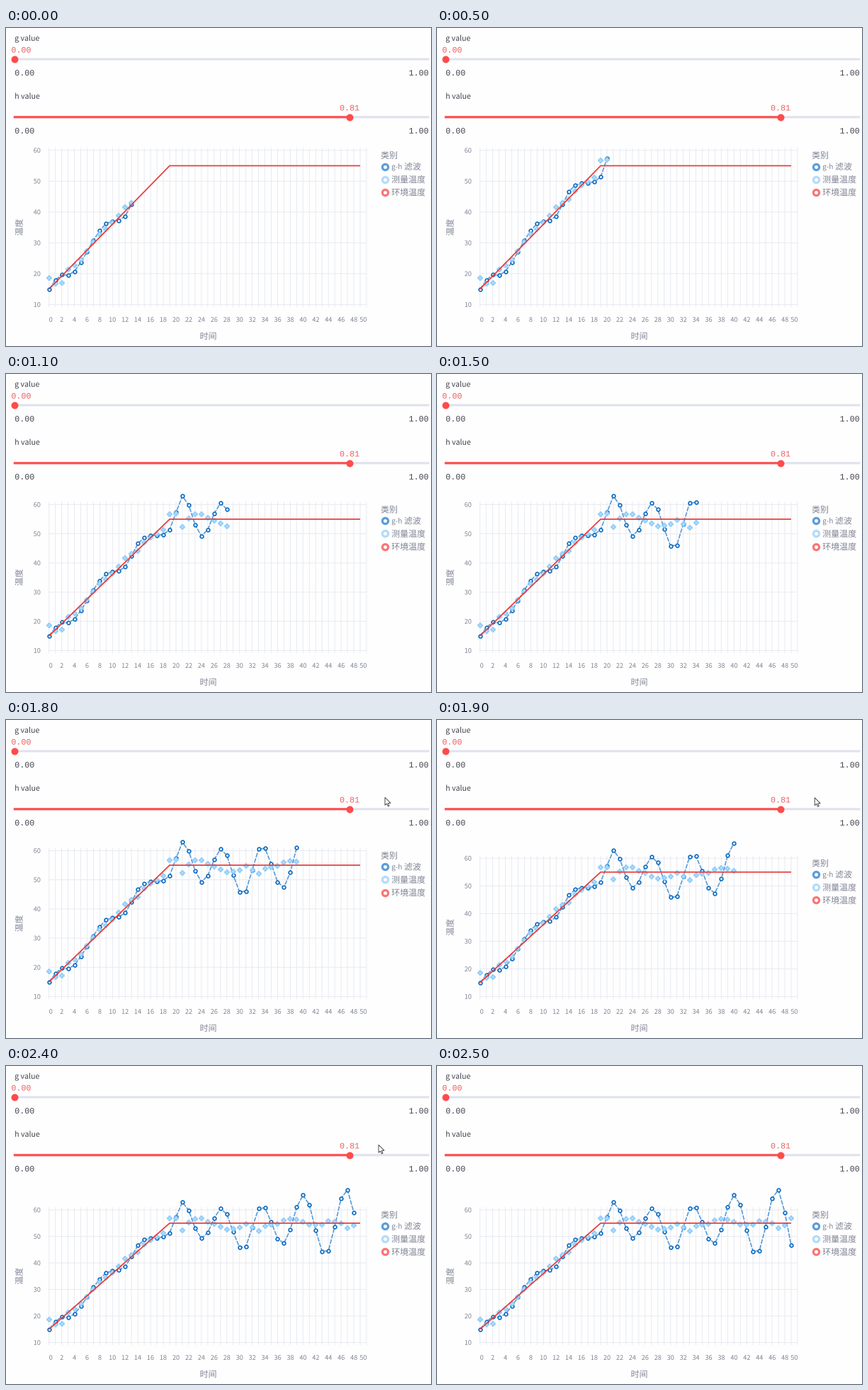
These frames come from a looping animation (600x449 px, 3200 ms). A matplotlib script:

```python
import numpy as np
import matplotlib.pyplot as plt
from matplotlib.animation import FuncAnimation
from matplotlib.collections import LineCollection
from matplotlib.patches import PathPatch, Polygon
from matplotlib.path import Path
from matplotlib.textpath import TextPath
from matplotlib.transforms import Affine2D

plt.rcParams["path.snap"] = False

W, H, DPI = 600, 449, 100
PX = 72 / DPI  # points per pixel
FRAMES, INTERVAL = 32, 100

SANS, MONO = "Noto Sans CJK JP", "Liberation Mono"
PAPER, RED, DARK, GRAY = "#fefefe", "#ff4b4b", "#41434e", "#808495"
BLUE, SKY = "#0f6cc0", "#8bcbfa"

X0, STEP, Y10 = 60.7, 8.965, 390.4
G, GAIN = 0.00, 0.81

# Turning points of the filter around the ambient temperature: hour, offset
SWINGS = [(0, 0), (1.5, 1), (3.7, -2.7), (8.7, 2.4), (11.9, -1.6),
          (14.4, 2.4), (18.9, -3.7), (21.05, 7.9), (24.1, -5.8), (27.2, 5.6),
          (30.5, -10), (33.5, 6.6), (36.8, -7.8), (40.1, 10.6),
          (43.5, -11.8), (46.8, 12.8), (49.8, -12.5)]


def eased(t, points):
    """Half cosine waves through the given turning points."""
    times, values = np.transpose(points)
    i = np.clip(np.searchsorted(times, t, "right") - 1, 0, len(times) - 2)
    part = np.clip((t - times[i]) / (times[i + 1] - times[i]), 0, 1)
    return values[i] + (values[i + 1] - values[i]) * (1 - np.cos(np.pi * part)) / 2


hours = np.arange(51)
ambient = np.minimum(15 + hours * 40 / 19, 55)
filtered = ambient + eased(hours, SWINGS)
# With g = 0 each reading z changes the filter's slope by h * (z - x).
slope = np.diff(filtered)
measured = filtered[:-1] + np.diff(slope, prepend=0) / GAIN

fig = plt.figure(figsize=(W / DPI, H / DPI), dpi=DPI, facecolor=PAPER)
ax = fig.add_axes([0, 0, 1, 1])
ax.set_xlim(0, W)
ax.set_ylim(H, 0)
ax.axis("off")


def x_at(hour):
    return X0 + STEP * hour


def place(patch, x, y, angle=0):
    flip = Affine2D().rotate_deg(angle).scale(1, -1).translate(x, y)
    patch.set_transform(flip + ax.transData)


def label(x, y, text, size, color=GRAY, align=0.5, font=SANS):
    """Outlined text centred vertically on y; align 0 is left, 1 is right."""
    path = TextPath((0, 0), text, size=size, prop={"family": font})
    box = path.get_extents()
    dx = -align * (box.x0 + box.x1) if align == 0.5 else -align * box.x1
    dy = -(0.33 if font == MONO else 0.37) * size
    patch = PathPatch(path.transformed(Affine2D().translate(dx, dy)),
                      fc=color, lw=0, zorder=7)
    ax.add_patch(patch)
    place(patch, x, y)
    return patch


def slider(y, name, value):
    left, right = 12.4, 596
    thumb = left + value * (right - left)
    for end, color in [(right, "#e0e3ee"), (thumb, RED)]:
        ax.plot([left, end], [y, y], color=color, lw=3.1 * PX)
    ax.plot(thumb, y, "o", color=RED, ms=10 * PX, mew=0)
    label(12.2, y - 29.8, name, 10.6, DARK, 0)
    label(max(thumb, 21.4), y - 13.2, f"{value:.2f}", 11.7, "#f05d60", font=MONO)
    label(12.2, y + 19.2, "0.00", 11.7, DARK, 0, MONO)
    label(596, y + 19.2, "1.00", 11.7, DARK, 1, MONO)


slider(44, "g value", G)
slider(125.8, "h value", GAIN)

# Fixed horizontal axis
for hour in range(0, 51, 2):
    label(x_at(hour), 411.5, str(hour), 9.1, align={0: 0, 50: 1}.get(hour, 0.5))
label(285.5, 434.9, "时间", 12)

# Parts that follow the vertical scale
grid = LineCollection([], colors="#e6e9f1", linewidths=0.9 * PX, zorder=1)
ax.add_collection(grid)
ticks = {v: label(48.4, 0, str(v), 9.1, align=1) for v in range(10, 61, 10)}
y_title = label(0, 0, "温度", 12)

legend = [(label(529, 0, "类别", 12, align=0), 529, 6.8)]
rings = []
for row, (color, text) in enumerate([("#5c9edb", ""), ("#b2dcfb", "测量温度"),
                                     ("#fa7676", "环境温度")]):
    dy = 22.8 + 18.2 * row
    ring, = ax.plot([], [], "o", ms=8.2 * PX, mfc=PAPER, mec=color, mew=3.2 * PX)
    rings.append((ring, dy))
    if text:
        legend.append((label(0, 0, text, 12, align=0), 544.2, dy))
    else:
        legend.append((label(0, 0, "g-h", 10, align=0), 544.2, dy))
        legend.append((label(0, 0, "滤波", 12, align=0), 562, dy))

# Plus sign with broad arms: one corner group turned four times
corner = np.array([(0.42, 0.42), (0.42, 1), (-0.42, 1)])
turns = [corner @ np.array([[np.cos(a), np.sin(a)], [-np.sin(a), np.cos(a)]])
         for a in np.arange(4) * np.pi / 2]
plus = Path(np.vstack(turns + [corner[:1]]), closed=True)

dash_line, = ax.plot([], [], color="#5598d5", lw=1.6 * PX, dashes=(4, 1),
                     zorder=3)
dots, = ax.plot([], [], "o", ms=4.7 * PX, mfc="white", mec=BLUE,
                mew=1.7 * PX, zorder=4)
crosses, = ax.plot([], [], marker=plus, ls="", ms=6.6 * PX, mfc="#cfe9fd",
                   mec=SKY, mew=1.5 * PX, zorder=5)
red_line, = ax.plot([], [], color="#ea3838", lw=1.7 * PX, zorder=6,
                    solid_joinstyle="miter", solid_capstyle="butt")

ARROW = np.array([(0, 0), (0, 11), (2.6, 8.7), (4.4, 12.6), (6, 11.9),
                  (4.4, 8.1), (8, 8)])
pointer = Polygon(ARROW, closed=True, fc="white", ec="#3a3a3a",
                  lw=0.9 * PX, zorder=9)
ax.add_patch(pointer)


def update(frame):
    last = int(np.round(np.interp(frame, [0, 6, 12, 18, 25],
                                  [13, 22, 29.6, 39, 49])))
    shown = slice(0, last + 1)
    # The 60 line drops whenever a new peak needs room above it.
    top = 172.7 + 4.05 * max(filtered[shown].max() - 60, 0)

    def y_at(value):
        return Y10 + (value - 10) * (top - Y10) / 50

    columns = [[(x_at(h), top - 3.7), (x_at(h), Y10 + 3.7)] for h in hours]
    rows = [[(X0, y_at(v)), (x_at(50), y_at(v))] for v in ticks]
    grid.set_segments(columns + rows)
    for value, text in ticks.items():
        place(text, 48.4, y_at(value))
    place(y_title, 18.3, (top + Y10) / 2, 90)
    for text, x, dy in legend:
        place(text, x, top + dy)
    for ring, dy in rings:
        ring.set_data([535.4], [top + dy])

    xs = x_at(hours)
    dash_line.set_data(xs[shown], y_at(filtered[shown]))
    dots.set_data(xs[shown], y_at(filtered[shown]))
    crosses.set_data(xs[shown], y_at(measured[shown]))
    red_line.set_data(xs[:50], y_at(ambient[:50]))

    keys = [16, 18, 23]
    pointer.set_visible(16 <= frame <= 24)
    pointer.set_xy(ARROW + (np.interp(frame, keys, [573, 535, 526]),
                            np.interp(frame, keys, [125, 109.3, 111.3])))
    return []


anim = FuncAnimation(fig, update, frames=FRAMES, interval=INTERVAL,
                     repeat=True, repeat_delay=0, blit=False)
plt.show()
```
